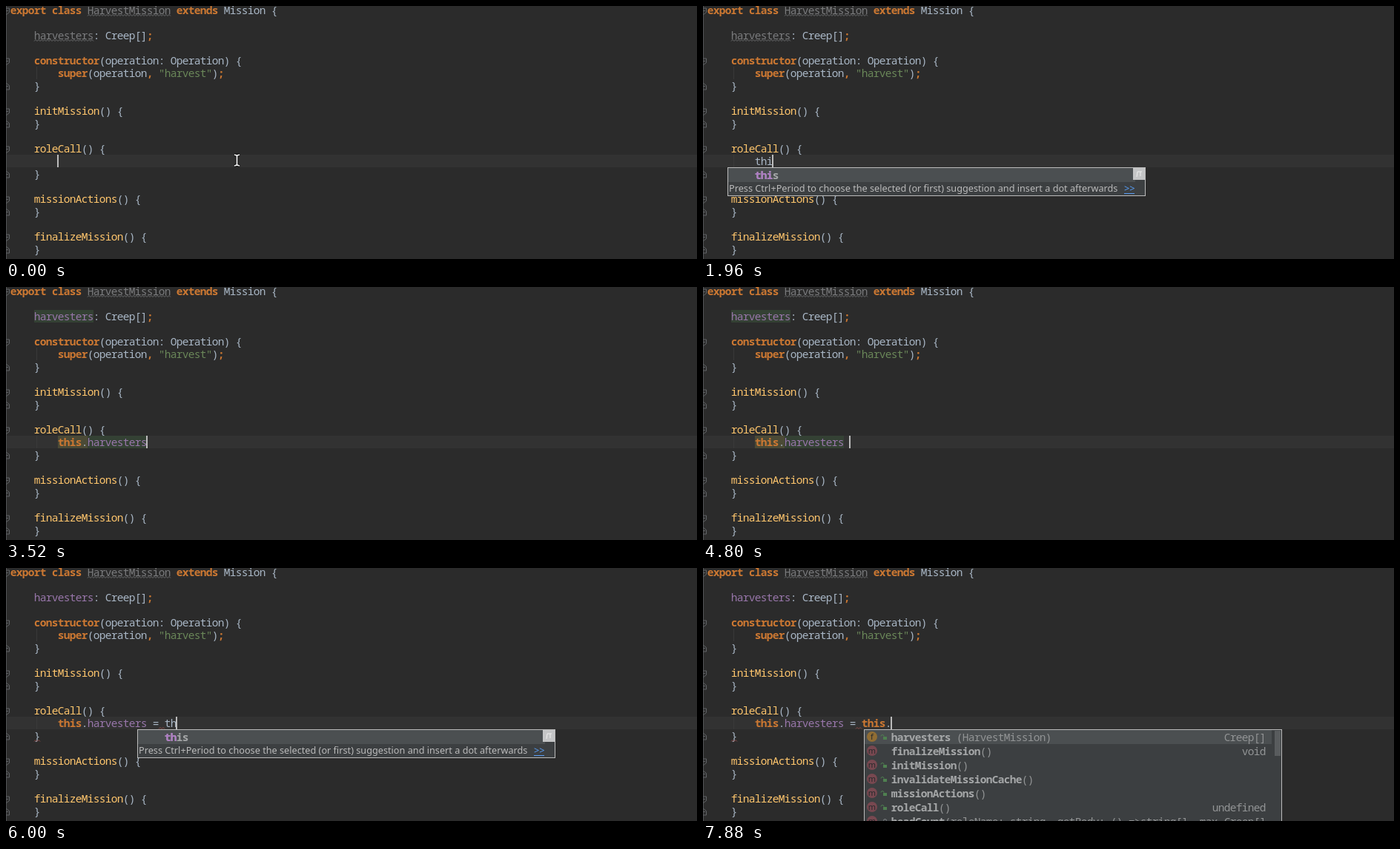
Write an HTML page with a canvas that moves like this. It is 932 px wide and 342 px high and loops after 8 s.

```html
<!DOCTYPE html>
<html lang="en">
<head>
<meta charset="utf-8">
<title>Code completion</title>
<style>
  html, body { margin: 0; width: 100%; height: 100%; overflow: hidden; background: #2b2b2b; }
  canvas { display: block; }
</style>
</head>
<body>
<canvas id="stage" width="932" height="342"></canvas>
<script>
const ctx = document.getElementById('stage').getContext('2d');
const LOOP = 8000, CHAR = 8, LINE = 17, ROW = 19, EDIT_LINE = 12;
const SIZE = 14.5, TRACKING = CHAR - 0.6 * SIZE;
const MONO = SIZE + 'px "Noto Sans Mono", "DejaVu Sans Mono", monospace';
const SANS = '12.7px "Noto Sans", "Open Sans", sans-serif';
const PLAIN = '#a9b7c6', KEYWORD = '#cc7832', METHOD = '#ffc66d', STRING = '#6a8759',
      FIELD = '#9876aa', UNUSED = '#7a7b7d', MATCH = '#b07cc6', ERROR = '#8a4a46';

// Each line: row, column, then text/colour pairs; keywords are set in bold.
const code = [
  [0, 0, 'export class ', KEYWORD, 'HarvestMission', UNUSED, ' extends ', KEYWORD, 'Mission {', PLAIN],
  [4, 4, 'constructor', KEYWORD, '(operation: Operation) {', PLAIN],
  [5, 8, 'super', KEYWORD, '(operation', PLAIN, ', ', KEYWORD, '"harvest"', STRING, ')', PLAIN, ';', KEYWORD],
  [6, 4, '}', PLAIN],
  [8, 4, 'initMission', METHOD, '() {', PLAIN],
  [9, 4, '}', PLAIN],
  [11, 4, 'roleCall', METHOD, '() {', PLAIN],
  [13, 4, '}', PLAIN],
  [15, 4, 'missionActions', METHOD, '() {', PLAIN],
  [16, 4, '}', PLAIN],
  [18, 4, 'finalizeMission', METHOD, '() {', PLAIN],
  [19, 4, '}', PLAIN]
];

// Completion item: icon, lock, name, detail, type, bold name.
const item = (icon, lock, name, detail = '', type = '', bold = true) => ({ icon, lock, name, detail, type, bold });
const word = name => item('', '', name);
const method = (name, type, lock = 'open') => item('m', lock, name, '()', type);

const harvesters = item('f', 'open', 'harvesters', ' (HarvestMission)', 'Creep[]');
const cache = method('invalidateMissionCache');
const headCount = item('m', 'shut', 'headCount', '(roleName: string, getBody: () =>string[], max', 'Creep[]');
const hasItems = [method('hasVision', 'boolean'), method('harvestPaths', 'void'), method('hasOwnProperty', 'boolean')];

const lists = {
  t: [
    item('V', 'open', 'toolbar', ' (lib.es6.d.ts)', 'BarProp', false),
    item('V', 'open', 'top', ' (lib.es6.d.ts)', 'Window', false),
    item('λ', 'open', 'toString', '() (lib.es6.d.ts)', 'string', false),
    word('this'), word('throw'), word('true'), word('try')
  ],
  th: [word('this'), word('throw')],
  this: [word('this')],
  members: [
    harvesters, method('finalizeMission', 'void', ''), method('initMission'), cache,
    method('missionActions'), method('roleCall', 'undefined'), headCount
  ],
  h: [harvesters, headCount, ...hasItems, method('headAnalysis', 'void'), cache],
  ha: [harvesters, ...hasItems]
};

// Typing: start time, text on the edited line, open list, typed prefix.
const typing = [
  [0, ''],
  [1360, 't'],
  [1520, 't', 't', 't'],
  [1680, 'th', 'th', 'th'],
  [1840, 'thi', 'this', 'thi'],
  [2000, 'this', 'this', 'this'],
  [2160, 'this'],
  [2440, 'this.', 'members', ''],
  [2520, 'this.h', 'h', 'h'],
  [2800, 'this.ha', 'ha', 'ha'],
  [3160, 'this.harvesters'],
  [4680, 'this.harvesters '],
  [4880, 'this.harvesters ='],
  [5120, 'this.harvesters = '],
  [5760, 'this.harvesters = t'],
  [5920, 'this.harvesters = t', 't', 't'],
  [6000, 'this.harvesters = th', 'this', 'th'],
  [6320, 'this.harvesters = thi', 'this', 'thi'],
  [6400, 'this.harvesters = this', 'this', 'this'],
  [6520, 'this.harvesters = this.'],
  [6840, 'this.harvesters = this.h', 'h', 'h'],
  [7880, 'this.harvesters = this.', 'members', '']
];

const colX = col => 6 + CHAR * col;
const lineTop = row => LINE * row - 3;
const between = (t, from, to) => t >= from && t < to;

function rect(x, y, w, h, color) {
  ctx.fillStyle = color;
  ctx.fillRect(x, y, w, h);
}

function text(str, x, y, color, font = SANS) {
  ctx.font = font;
  ctx.fillStyle = color;
  ctx.fillText(str, x, y);
}

// Monospaced text on the 8 px character grid.
function mono(str, x, y, color, bold = false) {
  ctx.letterSpacing = TRACKING + 'px';
  text(str, x + TRACKING / 2, y, color, (bold ? 'bold ' : '500 ') + MONO);
  ctx.letterSpacing = '0px';
}

function path(points, color, width = 1) {
  ctx.beginPath();
  points.forEach(([x, y]) => ctx.lineTo(x, y));
  ctx.strokeStyle = color;
  ctx.lineWidth = width;
  ctx.stroke();
}

function codeLine([row, col, ...spans]) {
  for (let i = 0; i < spans.length; i += 2) {
    mono(spans[i], colX(col), lineTop(row) + 14, spans[i + 1], spans[i + 1] === KEYWORD);
    col += spans[i].length;
  }
}

function squiggle(row, from, width, color) {
  const points = [];
  for (let i = 0; i <= width; i += 2) points.push([from + i, lineTop(row) + (i % 4 ? 14.5 : 16.5)]);
  path(points, color);
}

function foldMarks() {
  rect(0, 0, 1, 342, '#505254');
  for (const [row, , ...spans] of code) {
    if (row === 5) continue;
    const y = lineTop(row) + 10, dir = spans.at(-2) === '}' ? -1 : 1;
    const shape = [[0, y - 4 * dir], [4.5, y - 4 * dir], [4.5, y + 1.5 * dir], [0, y + 5 * dir]];
    path(shape, '#606366');
    path([[0, y - 0.5], [3, y - 0.5]], '#606366');
  }
}

function typedLine(str, t) {
  let col = 8;
  for (const part of str.split(/(this|harvesters)/)) {
    const color = part === 'this' ? KEYWORD : part === 'harvesters' && t >= 3440 ? FIELD : PLAIN;
    codeLine([EDIT_LINE, col, part, color]);
    col += part.length;
  }
}

function editor(t, typed) {
  rect(0, 0, 932, 342, '#2b2b2b');
  rect(0, lineTop(EDIT_LINE), 932, LINE, '#323232');
  foldMarks();
  rect(41, lineTop(5), 1, LINE, '#393939');
  if (typed) rect(41, lineTop(EDIT_LINE), 1, LINE, '#393939');

  if (between(t, 3520, 5120)) {
    rect(38, lineTop(2), 80, LINE, '#344134');
    rect(70, lineTop(EDIT_LINE), 40, LINE, '#4b4a36');
    rect(110, lineTop(EDIT_LINE), 80, LINE, '#344134');
  }
  code.forEach(codeLine);
  const used = t >= 3440;
  codeLine([2, 4, 'harvesters', used ? FIELD : UNUSED, ': Creep[]', PLAIN, ';', KEYWORD]);
  squiggle(0, 110, 112, '#6c6d6f');
  if (!used) squiggle(2, 38, 80, '#6c6d6f');
  typedLine(typed, t);

  if (t >= 5280) {
    squiggle(EDIT_LINE, 206, t < 5560 ? 14 : 8, ERROR);
    squiggle(13, 38, 8, ERROR);
  }
  if (between(t, 4400, 4680)) bulb();
  const blinkOff = between(t, 280, 840) || between(t, 7520, 7880);
  if (!blinkOff) rect(colX(8 + typed.length) - 1, lineTop(EDIT_LINE), 2, LINE, '#bbbbbb');
}

function bulb() {
  ctx.beginPath();
  ctx.arc(20, 204, 4.5, 0, 7);
  ctx.fillStyle = '#e8bf58';
  ctx.fill();
  rect(18, 209, 4, 5, '#9a9a9a');
}

function mouse() {
  const beam = [[[308, 201], [311.5, 202], [315, 201]], [[311.5, 202], [311.5, 215]], [[308, 216], [311.5, 215], [315, 216]]];
  beam.forEach(p => path(p, '#111', 4));
  beam.forEach(p => path(p, '#eee', 1.8));
}

function icon(letter, x, y) {
  const colors = { V: '#8a6a35', f: '#916d34', m: '#784850', 'λ': '#784850' };
  ctx.beginPath();
  ctx.arc(x, y, 7, 0, 7);
  ctx.fillStyle = colors[letter];
  ctx.fill();
  ctx.textAlign = 'center';
  text(letter, x, y + 4, '#272a2c', '11px "Noto Sans", sans-serif');
  ctx.textAlign = 'left';
}

function lock(kind, x, y) {
  const color = kind === 'open' ? '#4f8050' : '#85888a';
  rect(x - 1, y - 1, 5, 4, color);
  ctx.beginPath();
  ctx.arc(kind === 'open' ? x - 2 : x + 1.5, y - 1.5, 2, Math.PI, 0);
  ctx.strokeStyle = color;
  ctx.lineWidth = 1;
  ctx.stroke();
}

function popup(name, typed, prefix) {
  const items = lists[name];
  const x = colX(8 + typed.length - prefix.length) - 37, y = 218, width = 564;
  const tall = items.length > 6, hint = !tall;
  const height = tall ? 140 : items.length * ROW + 20;
  rect(x, y, width, height, '#bbbbbb');
  rect(x + 1, y + 1, width - 2, height - 2, '#3c3f41');
  rect(x + 1, y + 1, width - 15, ROW, '#4b4f51');

  items.forEach((it, i) => {
    const base = y + 16 + ROW * i, left = x + 37;
    const color = it.bold ? '#a5a7a8' : '#929495';
    if (it.icon) icon(it.icon, x + 11, base - 6);
    if (it.lock) lock(it.lock, x + 27, base - 5);
    mono(it.name, left, base, color, it.bold);
    mono(it.detail, left + CHAR * it.name.length, base, '#929495');
    if (prefix && it.name.startsWith(prefix)) mono(prefix, left, base, MATCH, it.bold);
    mono(it.type, x + width - 22 - CHAR * it.type.length, base, '#929495');
  });

  if (tall && name !== 't') rect(x + width - 10, y + 2, 8, 34, '#595c5e');
  if (hint) {
    const top = y + 1 + items.length * ROW;
    text('Press Ctrl+Period to choose the selected (or first) suggestion and insert a dot afterwards',
      x + 2, top + 13, '#bbbbbb');
    text('>>', x + 535, top + 13, '#589df6');
    rect(x + 535, top + 15, 14, 1, '#589df6');
    rect(x + 547, y + 1, 16, 16, '#c4c5c6');
    path([[x + 552, y + 13], [x + 553, y + 6], [x + 559, y + 6]], '#eeeeee');
    path([[x + 557, y + 6], [x + 557, y + 12]], '#eeeeee');
  }
}

function draw(t) {
  const [, typed, list, prefix] = typing.findLast(step => step[0] <= t);
  editor(t, typed);
  if (t < 1360) mouse();
  if (list) popup(list, typed, prefix);
}

const start = performance.now();
function frame() {
  draw(Math.max(0, performance.now() - start) % LOOP);
  requestAnimationFrame(frame);
}
frame();
</script>
</body>
</html>
```
